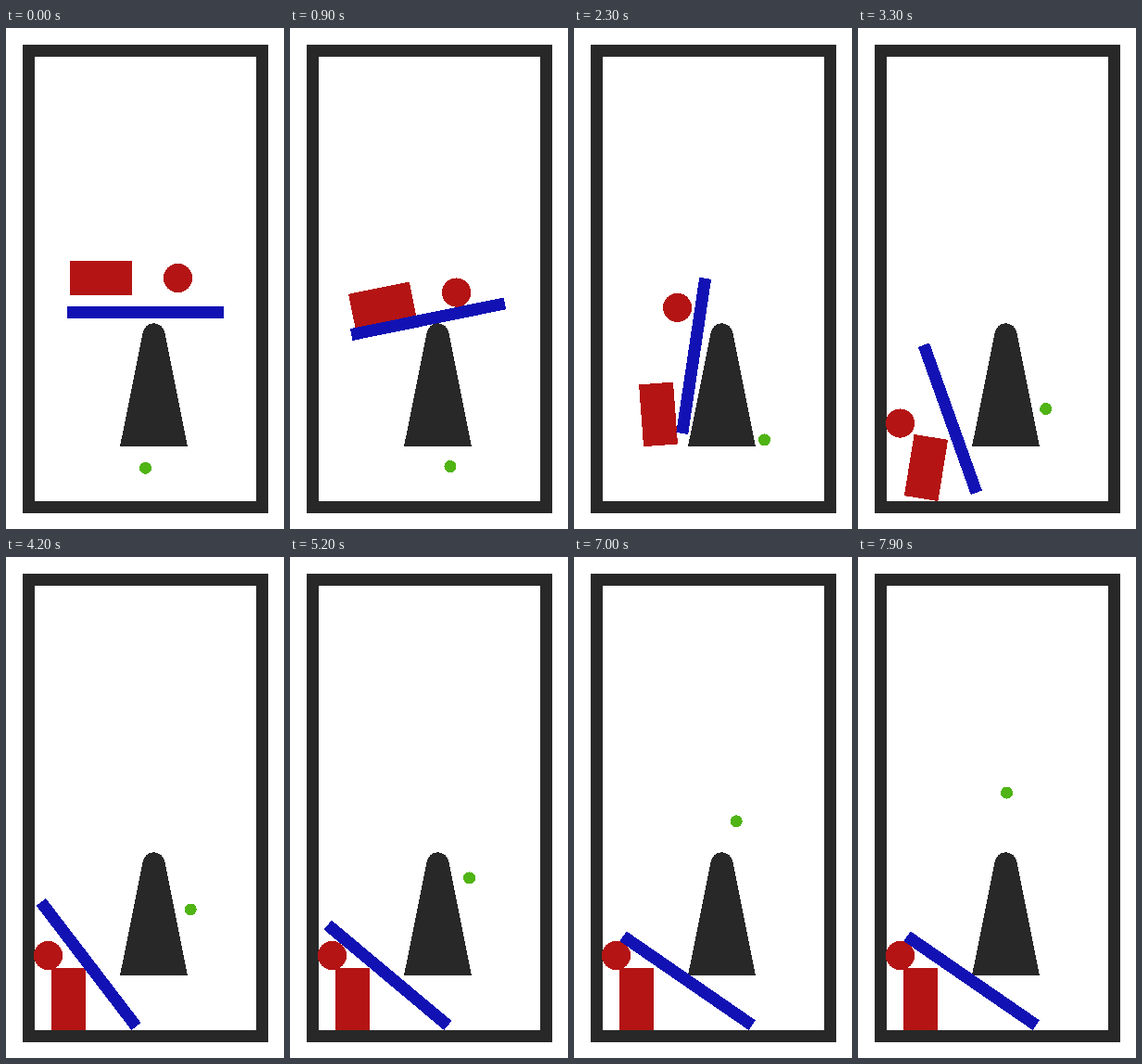
An HTML page that plays this animation: 300 px wide and 540 px high, repeating every 8 s.

```html
<!DOCTYPE html>
<html lang="en">
<head>
<meta charset="utf-8">
<title>Falling beam</title>
<style>
html, body { margin: 0; width: 100%; height: 100%; overflow: hidden; background: #fff; }
svg { display: block; width: 100vw; height: 100vh; }
</style>
</head>
<body>
<svg viewBox="0 0 300 540" shape-rendering="crispEdges">
  <rect x="24.5" y="24.5" width="252" height="492" fill="none" stroke="#282828" stroke-width="13"/>
  <path d="M123 451L147.7 328.1A12 12 0 0 1 171.3 328.1L196 451Z" fill="#282828"/>
  <rect id="block" x="-33.5" y="-18.5" width="67" height="37" fill="#b41414"/>
  <circle id="ball" r="15.6" fill="#b41414"/>
  <rect id="beam" x="-84.5" y="-6.5" width="169" height="13" fill="#1212b4"/>
  <circle id="dot" r="6.5" fill="#50b414"/>
</svg>
<script>
const LOOP = 8000, STEP = 100;
const G = 103, FLOOR = 510;
const PIVOT = { x: 159.5, y: 330.5 };
// Moments in seconds: load lands, load slides off, beam and block reach the floor, beam rests
const LAND = 0.58, SLIP = 1.6, BLOCK_DOWN = 2.62, BEAM_DOWN = 3.3, REST = 6.4;

const rad = deg => deg * Math.PI / 180;
const mix = (a, b, u) => a + (b - a) * u;
const smooth = u => u * u * (3 - 2 * u);
const fall = t => G * t * t / 2;

// Point at a distance along and above a line tilted by angle
function offset(p, angle, along, above) {
  const c = Math.cos(rad(angle)), s = Math.sin(rad(angle));
  return { x: p.x + along * c + above * s, y: p.y + along * s - above * c, angle };
}

// The beam rolls over the rounded tip, carrying block and ball
function rolling(t) {
  const d = Math.max(0, t - LAND);
  const angle = -(30 * d + 18.3 * d * d), u = angle / -49.6;
  const axis = offset(PIVOT, angle, mix(-9, 0, u), 18.5);
  const drop = (p, y) => ({ ...p, y: Math.min(p.y, y + fall(t)) });
  return {
    beam: drop(axis, 306.5),
    block: drop(offset(axis, angle, mix(-48, -36.7, u), 25), 269.5),
    ball: drop(offset(axis, angle, mix(35, 37.9, u), 22), 269.5)
  };
}

function beamAt(t) {
  const d = t - SLIP;
  if (t < BEAM_DOWN) return {
    x: 145.6 - (20.7 + 3.9 * d) * d,
    y: 318.5 + (42.4 + 10.6 * d) * d,
    angle: -49.6 - (52.8 - 10.3 * d) * d
  };
  // Its foot slides along the floor while it leans over
  const left = Math.max(0, (REST - t) / (REST - BEAM_DOWN));
  const foot = {
    x: mix(188.5, 121.7, smooth(left)),
    y: Math.min(FLOOR, 503 + 70 * (t - BEAM_DOWN))
  };
  return offset(foot, -145.45 + 35.8 * left * left, 84.5, -6.5);
}

function blockAt(t) {
  const d = Math.min(t, BLOCK_DOWN) - SLIP;
  const rock = Math.min(1.5, Math.max(0, (t - BLOCK_DOWN) / 0.68));
  const angle = t < BLOCK_DOWN
    ? -49.6 - (86 - 31.7 * d) * d
    : -90 - 14.3 * Math.cos(Math.PI * rock) * (1 - 0.357 * rock);
  const lean = rad(angle + 90);
  const ground = FLOOR - 33.5 * Math.cos(lean) - 18.5 * Math.abs(Math.sin(lean));
  const fell = t - SLIP;
  return {
    x: 103 - 17.1 * d - 18.1 * rock / 1.5,
    y: Math.min(ground, 330.5 + 86.7 * fell + fall(fell)),
    angle
  };
}

function ballAt(t) {
  const d = t - SLIP;
  return {
    x: Math.max(45.5, 153.5 - (57.4 + 3.6 * d) * d),
    y: Math.min(429.5, 275.5 + d + fall(d)),
    angle: 0
  };
}

// Drifts right, then rises steadily past the cone
function dotAt(t) {
  const d = t - 2.3;
  const rise = 0.32 * Math.log(1 + Math.exp((t - 1.42) / 0.32));
  return {
    x: Math.min(150.5 + 25 * t, 205.5 - 2.7 * d - 0.17 * d ** 3),
    y: 474.5 - 34 * rise,
    angle: 0
  };
}

function draw(ms) {
  const t = Math.floor(ms % LOOP / STEP) * STEP / 1000;
  const bodies = t < SLIP
    ? rolling(t)
    : { beam: beamAt(t), block: blockAt(t), ball: ballAt(t) };
  bodies.dot = dotAt(t);
  for (const id in bodies) {
    const { x, y, angle } = bodies[id];
    document.getElementById(id).setAttribute("transform", `translate(${x} ${y}) rotate(${angle})`);
  }
}

const start = performance.now();
function tick() {
  draw(performance.now() - start);
  requestAnimationFrame(tick);
}
tick();
</script>
</body>
</html>
```
